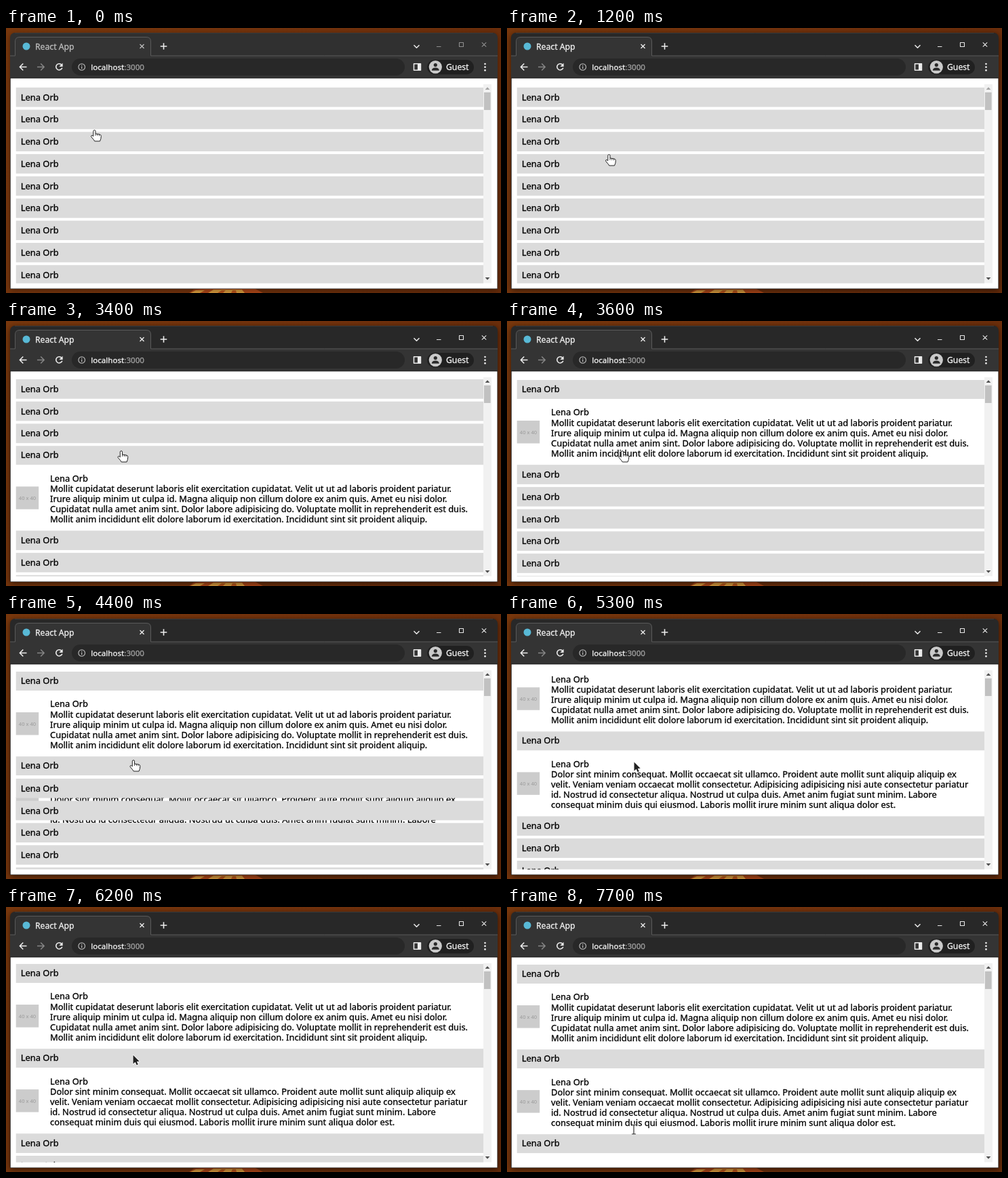
Animation, 730 px wide and 391 px high, one loop 8000 ms. Source, as an HTML page with a canvas:

```html
<!DOCTYPE html>
<html lang="en">
<head>
<meta charset="utf-8">
<title>React App</title>
<style>
html, body { margin: 0; width: 100%; height: 100%; overflow: hidden; background: #6b2f0d; }
canvas { display: block; width: 730px; height: 391px; }
</style>
</head>
<body>
<canvas id="stage" width="730" height="391"></canvas>
<script>
const ctx = document.getElementById('stage').getContext('2d');
const LOOP = 8000;
const FONT = '"Noto Sans", "Open Sans", sans-serif';
const NAME = 'Lena Orb';
const BODY = 12.93;

// List geometry
const VIEW = { x: 14, y: 83, w: 702, h: 293.7 };
const FIRST = 87.8, PITCH = 32.75, OPEN_PITCH = 125.1, ROW_H = 28.7;

const DETAILS = {
  3: ['Mollit cupidatat deserunt laboris elit exercitation cupidatat. Velit ut ut ad laboris proident pariatur.',
      'Irure aliquip minim ut culpa id. Magna aliquip non cillum dolore ex anim quis. Amet eu nisi dolor.',
      'Cupidatat nulla amet anim sint. Dolor labore adipisicing do. Voluptate mollit in reprehenderit est duis.',
      'Mollit anim incididunt elit dolore laborum id exercitation. Incididunt sint sit proident aliquip.'],
  4: ['Dolor sint minim consequat. Mollit occaecat sit ullamco. Proident aute mollit sunt aliquip aliquip ex',
      'velit. Veniam veniam occaecat mollit consectetur. Adipisicing adipisicing nisi aute consectetur pariatur',
      'id. Nostrud id consectetur aliqua. Nostrud ut culpa duis. Amet anim fugiat sunt minim. Labore',
      'consequat minim duis qui eiusmod. Laboris mollit irure minim sunt aliqua dolor est.'],
  5: []
};

// When each row opens, and when the rows below make room for it
const OPENED = { 3: 1400, 4: 4400, 5: 7300 };
const PUSHED = { 3: 1400, 4: 4500, 5: 7500 };
const FOCUS = 1200;

const SCROLL = [
  [0, 0], [3400, 1.8], [3500, 62], [3600, 99], [3900, 100], [4000, 101],
  [5100, 103.4], [5300, 137.8], [5500, 187], [5600, 201.8],
  [6000, 190], [6100, 136], [6200, 102], [6300, 101]
];

// Pointer moves: start, steps, target x, target y
const MOVES = [
  [700, 4, 150.5, 187], [1800, 4, 170, 192], [4300, 1, 188, 216],
  [6500, 6, 188, 341], [7500, 3, 187, 321]
];
// Pointer shapes by time
const SHAPES = [
  [0, 'hand'], [5300, 'arrow'], [6500, 'hand'], [6600, 'arrow'],
  [6700, 'beam'], [7000, 'hand'], [7600, 'beam']
];

const held = (list, t) => list.filter(k => k[0] <= t).pop()[1];

function pointerAt(t) {
  let x = 130.5, y = 151;
  for (const [start, steps, tx, ty] of MOVES) {
    if (t < start) break;
    const p = Math.min(1, (Math.floor((t - start) / 100) + 1) / steps);
    x += (tx - x) * p;
    y += (ty - y) * p;
  }
  return [x, y];
}

function rect(x, y, w, h, fill) {
  ctx.fillStyle = fill;
  ctx.fillRect(x, y, w, h);
}

function round(x, y, w, h, r, fill) {
  ctx.beginPath();
  ctx.roundRect(x, y, w, h, r);
  ctx.fillStyle = fill;
  ctx.fill();
}

function disc(x, y, r, fill) {
  ctx.beginPath();
  ctx.arc(x, y, r, 0, Math.PI * 2);
  ctx.fillStyle = fill;
  ctx.fill();
}

function shape(d, fill) {
  ctx.fillStyle = fill;
  ctx.fill(new Path2D(d));
}

function stroke(d, color, width) {
  ctx.strokeStyle = color;
  ctx.lineWidth = width;
  ctx.stroke(new Path2D(d));
}

// A hairline outline gives the slightly heavier letter weight
function text(s, x, y, size, color, align = 'left', weight = 0.3) {
  ctx.font = `${size}px ${FONT}`;
  ctx.textAlign = align;
  ctx.fillStyle = ctx.strokeStyle = color;
  ctx.lineWidth = weight;
  ctx.lineJoin = 'round';
  ctx.fillText(s, x, y);
  if (weight) ctx.strokeText(s, x, y);
}

function wallpaper() {
  const g = ctx.createLinearGradient(0, 0, 730, 391);
  g.addColorStop(0, '#78370c');
  g.addColorStop(0.5, '#73320c');
  g.addColorStop(1, '#642a09');
  rect(0, 0, 730, 391, g);
  shape('M270 391 L277 386 L296 384 H366 L379 391Z', '#ad4617');
  shape('M272 391 L280 387 H293 L286 391Z M298 391 L306 386 H348 L352 391Z', '#d89a3c');
  shape('M312 391 L318 387 H324 L320 391Z M332 391 L334 387 H339 L340 391Z', '#b8541a');
}

function frame(active) {
  ctx.save();
  ctx.shadowColor = `rgba(0,0,0,${active ? 0.6 : 0.4})`;
  ctx.shadowBlur = 9;
  ctx.shadowOffsetY = 2;
  round(6, 7, 719, 378, [7, 7, 0, 0], active ? '#282828' : '#303030');
  ctx.restore();
  stroke('M13 7.5 H718', '#3a3a3a', 1);
}

function tabStrip(active) {
  const ink = active ? '#f0f0f0' : '#bcbcbc';
  const ctl = active ? '#e6e6e6' : '#8e8e8e';
  rect(6, 41, 719, 33, '#343434');
  shape('M14 42 V20 Q14 13 21 13 H207 Q214 13 214 20 V42Z', '#343434');
  stroke('M6 41 H13.5 V20 Q13.5 13.5 20 13.5 H207 Q213.5 13.5 213.5 20 V41 H725', '#5a5a5a', 1);
  disc(30, 27, 5.5, '#58b9d6');
  text('React App', 43, 31.5, 12.2, ink);
  stroke('M197.5 24 l6 6 m0 -6 l-6 6', ink, 1.3);
  stroke('M227.7 27 h9.6 M232.5 22.2 v9.6', '#ededed', 1.6);
  stroke('M601.5 25.2 l4 4 l4 -4', '#e6e6e6', 1.6);
  stroke('M635 27.5 h6.5 M668.5 21.5 h6 v6 h-6 Z M701.8 21.3 l6.4 6.4 m0 -6.4 l-6.4 6.4', ctl, 1.1);
}

function toolbar() {
  const ink = '#ececec';
  stroke('M30.5 57.5 h-10 m4.8 -5 l-5 5 l5 5', ink, 1.6);
  stroke('M46 57.5 h10 m-4.8 -5 l5 5 l-5 5', '#858585', 1.6);
  stroke('M82.1 54.6 A4.6 4.6 0 1 0 82.8 58.7', ink, 1.6);
  shape('M83.6 51.8 V57 H78.4Z', ink);

  round(97, 45, 491, 25, 12.5, '#282828');
  stroke('M116.5 57.5 a4.8 4.8 0 1 0 -9.6 0 a4.8 4.8 0 1 0 9.6 0', '#c0c0c0', 1.1);
  rect(111.1, 56.6, 1.2, 3.7, '#c0c0c0');
  rect(111.1, 54.4, 1.2, 1.2, '#c0c0c0');
  text('localhost', 125.3, 61.7, 11.6, '#f2f2f2');
  const hostW = ctx.measureText('localhost').width;
  text(':3000', 125.3 + hostW, 61.7, 11.6, '#a0a0a0');

  stroke('M601.5 52.7 h10 v9.6 h-10 Z', ink, 1.5);
  rect(607, 52.5, 5, 10, ink);
  round(621, 47, 69, 21.5, 10.7, '#202020');
  disc(633.3, 57.6, 9.6, '#c9c9c9');
  disc(633.3, 54.6, 2.6, '#2a2a2a');
  shape('M627.8 62.8 Q628.3 58.6 633.3 58.6 Q638.3 58.6 638.8 62.8Z', '#2a2a2a');
  text('Guest', 649, 61.8, 12.2, '#f2f2f2');
  for (let i = 0; i < 3; i++) disc(706.5, 53 + i * 4.7, 1.35, ink);
}

function page() {
  rect(6, 73, 719, 1.4, '#242424');
  rect(6.8, 74.4, 717.6, 310, '#fff');
}

function details(top, lines) {
  rect(14.7, top + 60, 33.5, 33.5, '#cccccc');
  text('40 x 40', 31.5, top + 79.6, 7.6, '#9a9a9a', 'center', 0);
  [NAME, ...lines].forEach((s, i) => text(s, 65, top + 52.4 + i * 15.05, BODY, '#000'));
}

function list(t) {
  ctx.save();
  ctx.beginPath();
  ctx.rect(VIEW.x, VIEW.y, VIEW.w, VIEW.h);
  ctx.clip();
  const rows = [];
  let y = FIRST - held(SCROLL, t);
  for (let i = 0; i < 16; i++) {
    rows.push({ y, open: t >= OPENED[i] });
    y += t >= PUSHED[i] ? OPEN_PITCH : PITCH;
  }
  // Headers cover the text of a row that has no room yet
  rows.forEach((r, i) => r.open && details(r.y, DETAILS[i]));
  for (const { y, open } of rows) {
    const lift = open ? 0.8 : 0;
    rect(14.7, y, 689.3, ROW_H - lift, '#dbdbdb');
    text(NAME, 21.7, y + 18.9 - lift, BODY, '#000');
  }
  ctx.restore();
}

function scrollbar(t) {
  rect(704, 83, 12, 293.5, '#f1f1f1');
  rect(705, 95, 9.6, 26, '#c1c1c1');
  shape('M706.6 91 L710 87.3 L713.4 91Z', t >= SCROLL[1][0] ? '#505050' : '#a3a3a3');
  shape('M706.6 368 L710 371.7 L713.4 368Z', '#505050');
}

const POINTERS = {
  hand() {
    const d = 'M-1.7 8.8 V1.2 Q-1.6 -.3 0 -.3 Q1.5 -.3 1.5 1.2 V5 L7.6 6 ' +
      'Q9.8 6.4 9.8 8.6 L9.4 12.3 L8 16 H.2 L-1.2 13.8 L-4.8 9.6 Q-5.4 7.6 -3.6 7.4Z';
    shape(d, '#fff');
    stroke(d, '#222', 1);
    stroke('M1.5 5 v3 M4.3 5.6 v2.6 M7 6 v2.4', '#222', 0.8);
  },
  arrow() {
    const d = 'M-.5 2.5 V15.6 L2.6 12.8 L4.7 17.2 L6.8 16.2 L4.8 12 L8.7 11.7Z';
    stroke(d, '#fff', 1.6);
    shape(d, '#222');
  },
  beam() {
    const d = 'M-3 .5 H-1 Q0 .5 0 1.6 Q0 .5 1 .5 H3 M0 1.5 V13 M-3 14 H-1 Q0 14 0 12.9 Q0 14 1 14 H3';
    stroke(d, '#fff', 2.6);
    stroke(d, '#222', 1.1);
  }
};

function pointer(t) {
  ctx.save();
  ctx.translate(...pointerAt(t));
  ctx.lineJoin = 'round';
  POINTERS[held(SHAPES, t)]();
  ctx.restore();
}

function draw(now) {
  const t = now % LOOP;
  const active = t >= FOCUS;
  wallpaper();
  frame(active);
  tabStrip(active);
  toolbar();
  page();
  list(t);
  scrollbar(t);
  pointer(t);
}

const begin = performance.now();
function tick() {
  draw(performance.now() - begin);
  requestAnimationFrame(tick);
}
tick();
</script>
</body>
</html>
```
